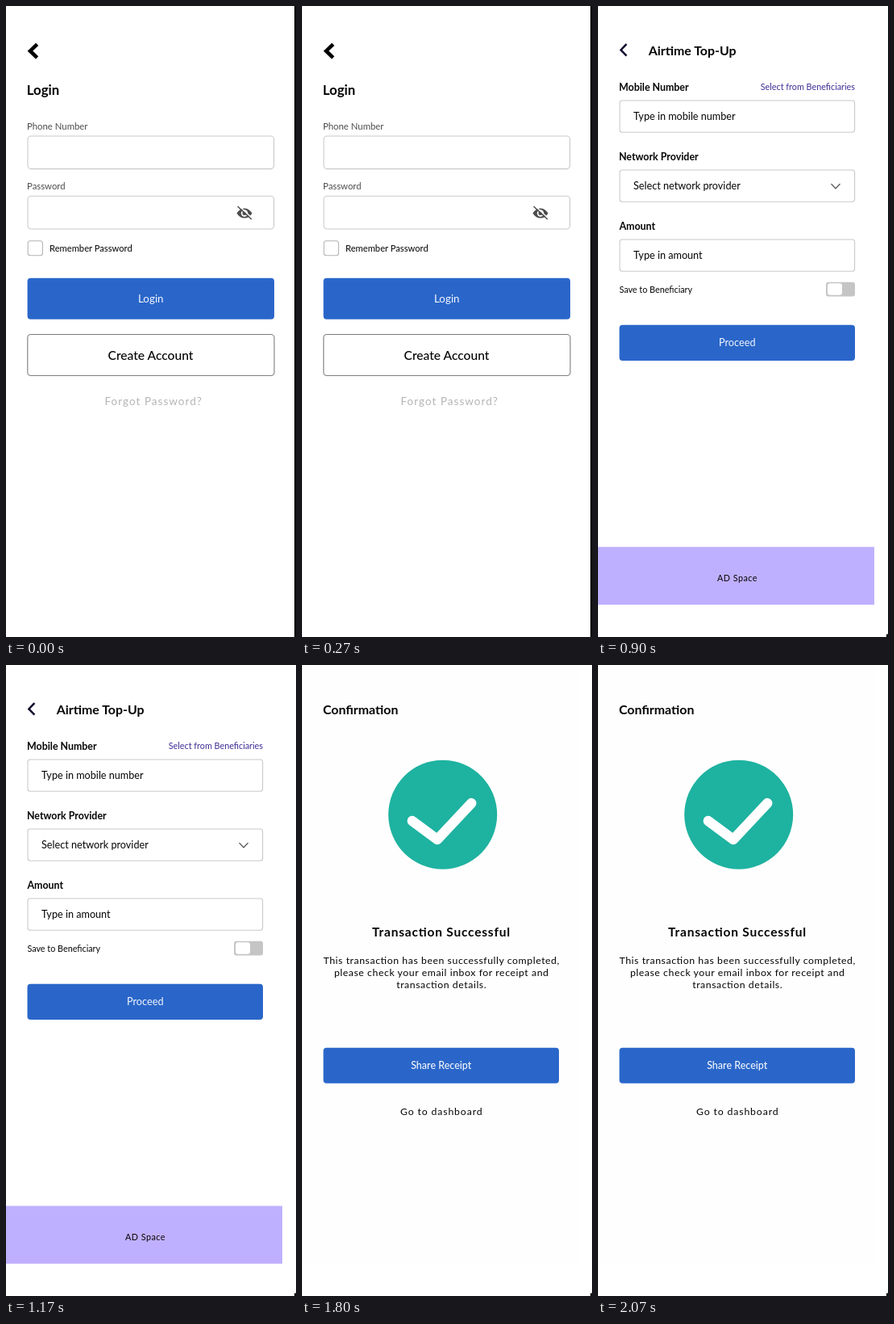
An HTML page that plays this animation: 360x781 px, repeating every 2250 ms.

```html
<!DOCTYPE html>
<html lang="en">
<head>
<meta charset="utf-8">
<title>Payment app screens</title>
<style>
  html, body { margin: 0; width: 100%; height: 100%; overflow: hidden; background: #fff; }
  svg { display: block; width: 100vw; height: 100vh; }
  text { font-family: Lato, sans-serif; font-feature-settings: "liga" 1; white-space: pre; }
  .screen {
    visibility: hidden;
    animation: show 2250ms step-end infinite;
    animation-delay: calc(var(--i) * 450ms - 2250ms);
  }
  @keyframes show {
    0% { visibility: visible; }
    20%, 100% { visibility: hidden; }
  }
</style>
</head>
<body>
<svg id="stage" viewBox="0 0 360 781"></svg>
<script>
const BLUE = '#2a66c9', INK = '#050505', GREY = '#4c4c4c', LINE = '#cacacc', PALE = '#f4f4f4';

const text = (x, y, str, size, { weight = 400, fill = INK, anchor = 'start', gap = 0 } = {}) =>
  `<text x="${x}" y="${y}" font-size="${size}" font-weight="${weight}" fill="${fill}"
    text-anchor="${anchor}" letter-spacing="${gap}">${str}</text>`;
const bold = (x, y, str, size, opts) => text(x, y, str, size, { weight: 700, ...opts });
const mid = (x, y, str, size, opts) => text(x, y, str, size, { anchor: 'middle', ...opts });

// Rectangles are given by their edges.
const box = (l, t, r, b, fill, radius = 4, stroke = 'none', width = 1) =>
  `<rect x="${l}" y="${t}" width="${r - l}" height="${b - t}" rx="${radius}"
    fill="${fill}" stroke="${stroke}" stroke-width="${width}"/>`;
const field = (l, t, r, b, stroke = LINE, width = 1.1) => box(l, t, r, b, '#fff', 4, stroke, width);
const line = (d, stroke, width, extra = '') =>
  `<path d="${d}" fill="none" stroke="${stroke}" stroke-width="${width}" ${extra}/>`;
const button = (l, t, r, b, label, size, weight = 400) =>
  box(l, t, r, b, BLUE) +
  mid((l + r) / 2, (t + b) / 2 + size * .35, label, size, { fill: '#f4f7fd', weight });

const edgeDot = box(358, 777.5, 360, 781, '#000', 0);
const thickBack = line('M38.6 47.4L30 55.7L38.6 64', '#000', 4.6);

const eye = `
  <path d="M286.5 256.5Q290 250.4 296 250.4T305.5 256.5Q302 262.6 296 262.6T286.5 256.5Z" fill="${GREY}"/>
  <circle cx="296" cy="256.5" r="4.2" fill="#fff"/>
  <circle cx="296" cy="256.5" r="2.5" fill="${GREY}"/>
  ${line('M288.6 247L306 263', '#fff', 1.5)}
  ${line('M287.5 248L304.8 264', GREY, 1.5)}`;

const login = () =>
  box(358, 0, 360, 781, '#000', 0) + thickBack +
  bold(25.8, 110, 'Login', 16.8) +
  text(26, 153, 'Phone Number', 11.35, { fill: GREY }) +
  field(27, 161, 332.6, 201.6) +
  text(26, 227, 'Password', 11.35, { fill: GREY }) +
  field(27, 235.2, 332.6, 276) + eye +
  box(27.2, 290.7, 45.4, 308.7, '#fff', 3, '#b5b5b8', 1.1) +
  text(54, 304, 'Remember Password', 11.2) +
  button(26.6, 336.8, 333, 387.8, 'Login', 13.4) +
  field(26.8, 406.5, 333, 457.5, '#7d7d7d', 1.1) +
  mid(179.5, 438, 'Create Account', 15.6, { weight: 500 }) +
  mid(183.2, 494, 'Forgot Password?', 13.5, { fill: '#b4b4b4', gap: 1.03 });

const pinRow = top => [[27, 93.3], [107, 174], [185.8, 252.8], [266.5, 332.6]]
  .map(([l, r]) => field(l, top, r, top + 55)).join('');

const createPin = () =>
  edgeDot + thickBack +
  bold(26, 110, 'Create Transaction PIN', 16.8) +
  text(26.7, 153, 'Transaction PIN', 11.35, { fill: GREY }) + pinRow(165.5) +
  text(26.4, 250.3, 'Confirm Transaction PIN', 11.35, { fill: GREY }) + pinRow(263) +
  button(26.8, 615, 333, 666, 'Proceed', 13.3);

const topUpForm = () =>
  line('M35.4 47.2L28.4 54.4L35.4 61.6', '#100c2e', 2.5) +
  bold(62.8, 61, 'Airtime Top-Up', 15.9) +
  bold(26, 105, 'Mobile Number', 12.4) +
  text(319, 104.3, 'Select from Beneficiaries', 10.8, { fill: '#3f2d94', anchor: 'end' }) +
  [[117, 'Type in mobile number'], [203, 'Select network provider'], [289, 'Type in amount']]
    .map(([top, hint]) => box(27, top, 318.6, top + 39.3, 'none', 3, LINE, 1.1) +
      text(44, top + 24.3, hint, 12.65)).join('') +
  bold(26, 191, 'Network Provider', 12.4) +
  line('M289.5 220.2L295 225.8L300.5 220.2', '#444', 1.2) +
  bold(26.5, 277, 'Amount', 12.4);

const topUp = () =>
  edgeDot + topUpForm() +
  text(26.4, 355, 'Save to Beneficiary', 10.8) +
  box(283, 341.7, 319, 359.5, '#c5c5c5', 3) + box(285, 343.3, 303, 357.8, '#fff', 3) +
  button(26.5, 394.8, 319, 439, 'Proceed', 12.7) +
  box(0, 669.5, 343, 741, '#bfb0ff', 0) +
  mid(173, 712, 'AD Space', 10.8, { gap: .45 });

const KEY_COLUMNS = [[26.5, 115.2], [128.3, 217], [230.3, 319]];
const digit = (l, t, r, label) =>
  box(l, t, r, t + 62, '#fff', 8) + mid((l + r) / 2, t + 41.8, label, 28.4, { weight: 700 });

const keypad = () => {
  let keys = box(17.5, 291.3, 328, 583.5, PALE);
  for (let n = 0; n < 9; n++) {
    const [l, r] = KEY_COLUMNS[n % 3];
    keys += digit(l, 300 + 71 * Math.floor(n / 3), r, n + 1);
  }
  return keys + digit(26.5, 513, 217, 0) +
    box(230.3, 513, 319, 575, '#fff', 1) +
    `<path d="M258.5 543.5L266 532.8Q267.3 531 269.5 531H288.5Q291.5 531 291.5 534V553Q291.5 556 288.5 556H269.5Q267.3 556 266 554.2Z"/>` +
    line('M272.5 538.3L282.9 548.7M282.9 538.3L272.5 548.7', '#fff', 2.6);
};

const paymentPin = () =>
  edgeDot + `<g transform="translate(0 2)">${topUpForm()}</g>` +
  box(0, 0, 342.4, 180, 'rgba(0,0,0,.35)', 0) +
  box(342, 669.5, 343, 741, '#bfb0ff', 0) +
  '<path d="M0 781V168.500A27 27 0 0 1 27 141.500H315.500A27 27 0 0 1 342.500 168.500V781Z" fill="#fff"/>' +
  line('M308.4 168.6L318.4 178.6M318.4 168.6L308.4 178.6', '#333', 1.3) +
  mid(172.8, 191.2, 'Enter Payment PIN', 14.3, { weight: 700, fill: '#1c1c1c' }) +
  [63, 120.4, 177.7, 235.3].map(x => box(x, 216, x + 48.5, 256, PALE)).join('') +
  mid(173, 276, 'Forgot Payment PIN', 7.15) +
  keypad() +
  button(26.5, 628, 319, 672, 'Proceed', 12.7);

const confirmation = () =>
  edgeDot + box(0, 0, 343, 741, '#fefefe', 0) +
  bold(26, 61, 'Confirmation', 15.9) +
  '<circle cx="174.7" cy="185.200" r="67.500" fill="#1eb2a0"/>' +
  line('M136.800 193L168 216L210.300 171', '#fff', 12.4, 'stroke-linecap="round" stroke-linejoin="round"') +
  mid(173, 336, 'Transaction Successful', 15.5, { weight: 700, gap: .78 }) +
  ['This transaction has been successfully completed,',
   'please check your email inbox for receipt and',
   'transaction details.']
    .map((row, i) => mid(173.2, 370 + 15 * i, row, 12.3, { gap: .55 })).join('') +
  button(26.5, 473.8, 319, 517.8, 'Share Receipt', 12.5, 500) +
  mid(173.2, 556.8, 'Go to dashboard', 12.3, { gap: .85 });

document.getElementById('stage').innerHTML =
  [login, createPin, topUp, paymentPin, confirmation]
    .map((draw, i) => `<g class="screen" style="--i:${i}">${draw()}</g>`).join('');
</script>
</body>
</html>
```
